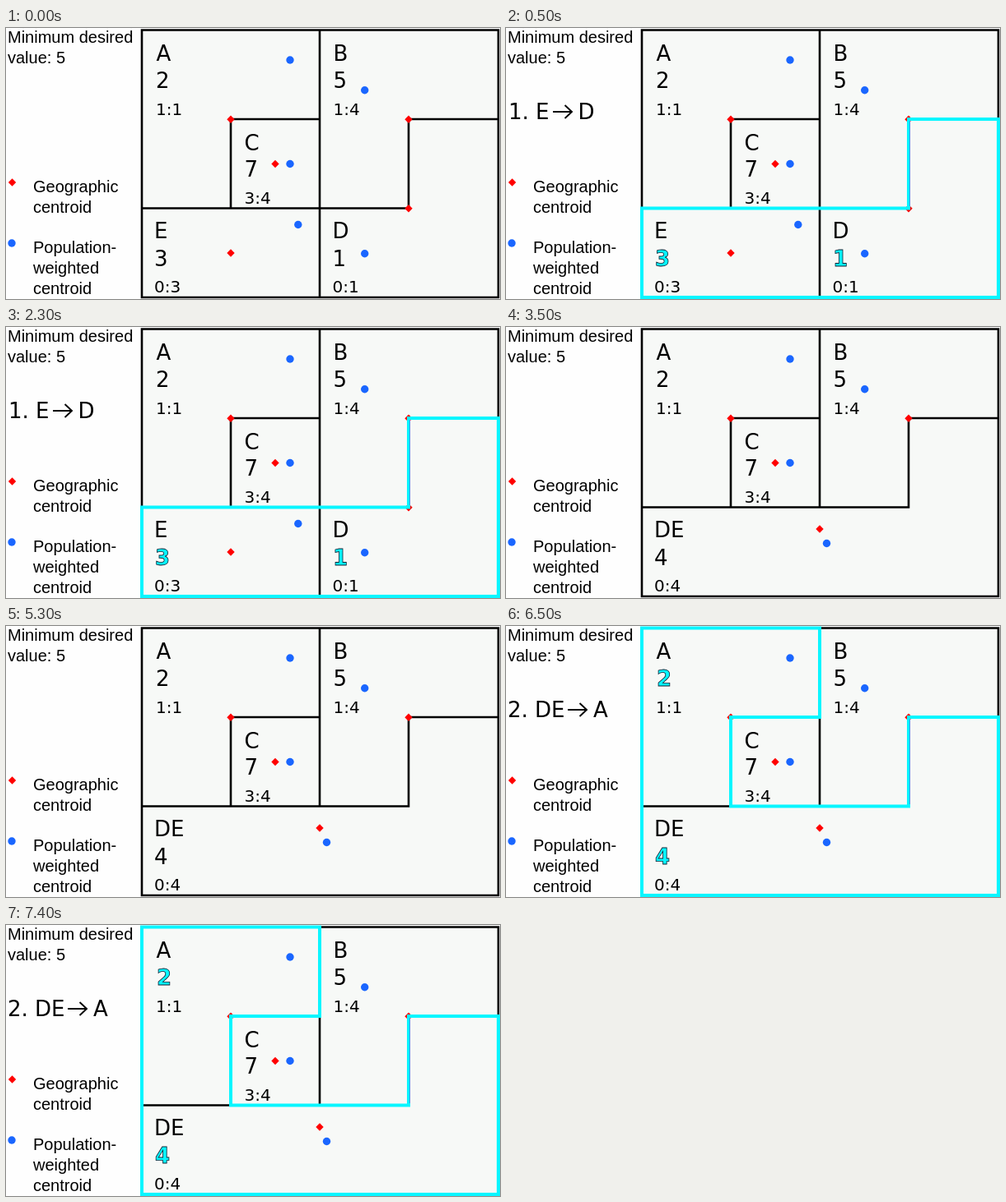
Recreate the animation shown at these times as an HTML page. Size 600 px wide and 330 px high, loop 8 s.

```html
<!DOCTYPE html>
<html lang="en">
<head>
<meta charset="utf-8">
<title>Merging regions</title>
<style>
html, body { margin: 0; width: 100%; height: 100%; overflow: hidden; background: #fefefe; }
svg { display: block; width: 600px; height: 330px; }
text { font: 26px "DejaVu Sans", Verdana, sans-serif; fill: #000; }
.key text { font: 20px "Liberation Sans", Arial, sans-serif; }
text.ratio { font-size: 20px; }
.lines { fill: none; stroke: #000; stroke-width: 2.6; }
.geo { fill: #f00; }
.pop { fill: #1a66ff; }
.glow { fill: none; stroke: #08f6ff; stroke-width: 4; }
.edge { fill: none; stroke: #4a90e8; stroke-width: 1; }
.arrow { fill: none; stroke: #000; stroke-width: 1.9; }
text.hot { font-weight: bold; fill: #08f6ff; stroke: #123; stroke-width: .8; }

/* Phases: start 0 s, merge one 0.5 s, joined 3.5 s, merge two 6.5 s */
.start, .one, .split, .joined, .idle, .calm, .two { animation: 8s step-end infinite; }
.start { animation-name: start; }
.one { animation-name: one; }
.split { animation-name: split; }
.joined { animation-name: joined; }
.idle { animation-name: idle; }
.calm { animation-name: calm; }
.two { animation-name: two; }
@keyframes start { 0% { visibility: visible } 6.25%, 100% { visibility: hidden } }
@keyframes one { 0% { visibility: hidden } 6.25% { visibility: visible } 43.75%, 100% { visibility: hidden } }
@keyframes split { 0% { visibility: visible } 43.75%, 100% { visibility: hidden } }
@keyframes joined { 0% { visibility: hidden } 43.75%, 100% { visibility: visible } }
@keyframes idle { 0% { visibility: hidden } 43.75% { visibility: visible } 81.25%, 100% { visibility: hidden } }
@keyframes calm { 0% { visibility: visible } 81.25%, 100% { visibility: hidden } }
@keyframes two { 0% { visibility: hidden } 81.25%, 100% { visibility: visible } }
</style>
</head>
<body>
<svg viewBox="0 0 600 330">
  <defs>
    <path id="geo" class="geo" d="M0-4.7 4.7 0 0 4.7-4.7 0Z"/>
    <circle id="pop" class="pop" r="4.7"/>
    <path id="arrow" class="arrow" d="M0 0H23M14.5-8 23 0 14.5 8"/>
  </defs>

  <g class="key">
    <text x="2" y="18">Minimum desired</text>
    <text x="2" y="43">value: 5</text>
    <use href="#geo" x="7.5" y="188"/>
    <text x="33" y="200">Geographic</text>
    <text x="33" y="225">centroid</text>
    <use href="#pop" x="7" y="262"/>
    <text x="33" y="274">Population-</text>
    <text x="33" y="299">weighted</text>
    <text x="33" y="324">centroid</text>
  </g>

  <rect x="165" y="2.5" width="433" height="325.5" fill="#f7f9f7"/>
  <g class="lines">
    <path d="M165 2.5H598V328H165ZM381 2.5V219.5M273 219.5V111H381M165 219.5H489V111H598"/>
    <path class="split" d="M381 219.5V328"/>
  </g>

  <use href="#geo" x="273" y="111.3"/>
  <use href="#geo" x="489" y="111.3"/>
  <use href="#geo" x="327" y="165.5"/>
  <use href="#pop" x="345" y="39"/>
  <use href="#pop" x="435.7" y="75.7"/>
  <use href="#pop" x="345" y="165.5"/>
  <g class="split">
    <use href="#geo" x="273" y="274"/>
    <use href="#geo" x="489" y="219.7"/>
    <use href="#pop" x="354.8" y="239.5"/>
    <use href="#pop" x="435.7" y="274.7"/>
  </g>
  <g class="joined">
    <use href="#geo" x="381" y="246"/>
    <use href="#pop" x="389.5" y="263.5"/>
  </g>

  <g class="one">
    <path class="glow" d="M165 219.5H489V111H598V328H165Z"/>
    <path class="edge" d="M490.5 113V217"/>
  </g>
  <g class="two">
    <path class="glow" d="M165 2.5H381V111H273V219.5H489V111H598V328H165Z"/>
    <path class="edge" d="M490.5 113V217"/>
  </g>

  <text x="182.5" y="40">A</text>
  <text x="182" y="73" class="calm">2</text>
  <text x="182" y="106" class="ratio">1:1</text>
  <text x="397.5" y="40">B</text>
  <text x="397.5" y="73">5</text>
  <text x="397.5" y="106" class="ratio">1:4</text>
  <text x="289.5" y="149">C</text>
  <text x="289.5" y="181">7</text>
  <text x="289.5" y="214" class="ratio">3:4</text>

  <g class="split">
    <text x="180" y="256">E</text>
    <text x="180" y="322" class="ratio">0:3</text>
    <text x="396.5" y="256">D</text>
    <text x="396.5" y="322" class="ratio">0:1</text>
  </g>
  <g class="start">
    <text x="180" y="290">3</text>
    <text x="396.5" y="290">1</text>
  </g>
  <g class="joined">
    <text x="180" y="256">DE</text>
    <text x="180" y="322" class="ratio">0:4</text>
  </g>
  <text x="180" y="290" class="idle">4</text>

  <g class="one">
    <text x="3" y="111">1. E</text>
    <use href="#arrow" x="57" y="102"/>
    <text x="87.5" y="111">D</text>
    <text x="181" y="290" class="hot">3</text>
    <text x="397" y="290" class="hot">1</text>
  </g>
  <g class="two">
    <text x="2" y="111">2. DE</text>
    <use href="#arrow" x="75" y="102"/>
    <text x="106" y="111">A</text>
    <text x="183" y="73" class="hot">2</text>
    <text x="181" y="290" class="hot">4</text>
  </g>
</svg>
</body>
</html>
```
